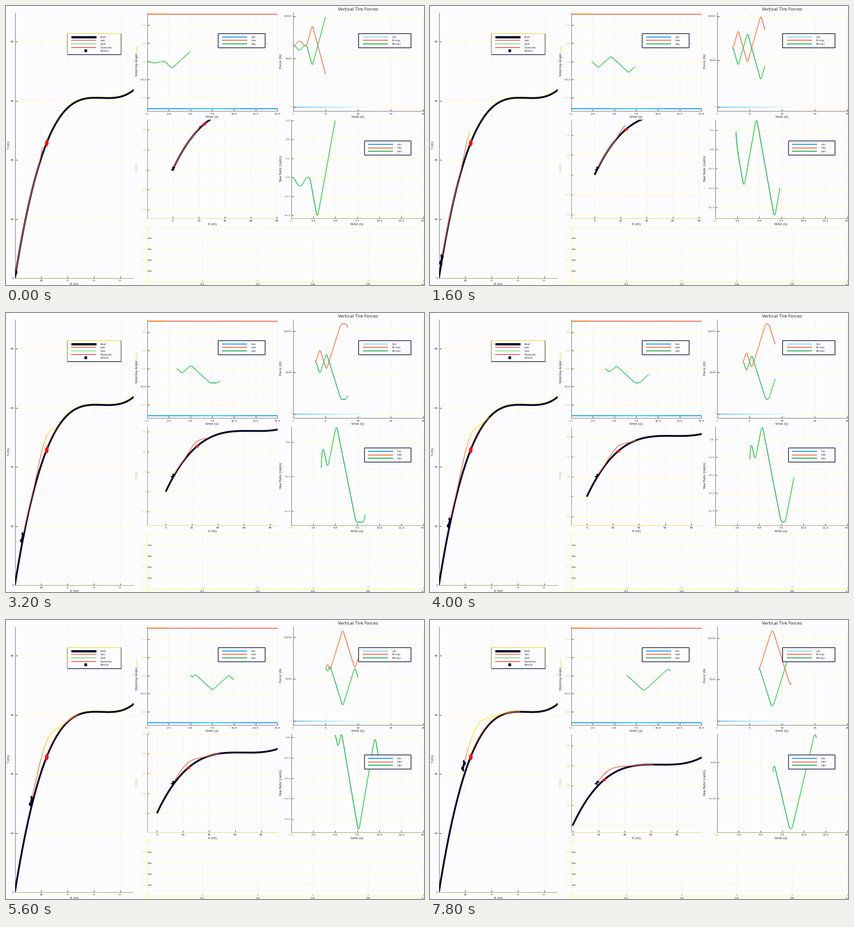
Animation of 917 by 611 pixels, one loop 8000 ms. Source, as a matplotlib script:

```python
import numpy as np
import matplotlib.pyplot as plt
from matplotlib.animation import FuncAnimation
from matplotlib.collections import LineCollection
from matplotlib.colors import to_rgb
from matplotlib.patches import Ellipse, Polygon, Rectangle

W, H, FRAMES = 917, 611, 40
PT = 0.72
NAVY, INK, DIM, YELLOW, PALE = "#04042c", "#26262e", "#8c8c50", "#f6f65a", "#ffffbe"
BLUE, CORAL, GREEN, RED = "#0a9af5", "#f4694a", "#22b056", "#f80f12"
CYAN, BACK, VGRID = "#5cccff", "#fcfcfe", "#f2f2de"

plt.rcParams["font.family"] = "DejaVu Sans"
fig = plt.figure(figsize=(W / 100, H / 100), dpi=100, facecolor=BACK)
ax = fig.add_axes([0, 0, 1, 1])
ax.set(xlim=(-0.5, W - 0.5), ylim=(H - 0.5, -0.5))  # pixel centres on integers
ax.axis("off")

BIG = (19, 13, 279, 595.5)
STEER = (309, 13, 595, 229)
FORCE = (629, 13, 916, 229)
LOCAL = (309, 248, 595, 464)
YAW = (625, 248, 915, 464)
LOW = (309, 483, 915, 603)
live = []


# ---- drawing helpers ----

def clip(art, box):
    if box:
        x0, y0, x1, y1 = box
        art.set_clip_path(Rectangle((x0, y0), x1 - x0, y1 - y0,
                                    transform=ax.transData))
    return art


def line(x, y, color, width=1.0, z=2, box=None):
    art, = ax.plot(x, y, color=color, lw=width * PT, zorder=z,
                   solid_capstyle="butt", solid_joinstyle="round")
    return clip(art, box)


def shaded(x, y, colors, width, z=4):
    p = np.c_[x, y]
    segs = np.stack([p[:-1], p[1:]], 1)
    return ax.add_collection(LineCollection(segs, colors=colors[:-1], zorder=z,
                                            linewidths=width * PT))


def gradient(stops, n):
    rgb = np.array([to_rgb(c) for c in stops])
    pos = np.linspace(0, 1, len(stops))
    return np.stack([np.interp(np.linspace(0, 1, n), pos, c) for c in rgb.T], 1)


def curve(x, y, falling, rising):
    # rising parts are drawn in a lighter tint
    up = np.gradient(y) < 0
    cols = np.where(up[:, None], to_rgb(rising), to_rgb(falling))
    live.append(shaded(x, y, cols, 1.9))


def text(x, y, s, size=6, color=INK, ha="center", va="center_baseline", rot=0):
    return ax.text(x, y, s, fontsize=size * PT, color=color, ha=ha,
                   va=va, rotation=rot, zorder=4)


def side(x, y, s, size=7, color=INK, va="center"):
    return text(x, y, s, size, color, va=va, rot=90)


def num(v, digits=1):
    return f"{v:.{digits}f}".replace("-", "−")


def xtick(x, box, label, color=INK, dy=6, tick=INK):
    return [line([x, x], [box[1], box[3]], VGRID, 1, 1),
            line([x, x], [box[3] - 4, box[3]], tick, 1, 3),
            text(x, box[3] + dy, label, 6, color)]


def ytick(y, box, label, color=INK, size=5, tick=INK):
    return [line([box[0], box[2]], [y, y], PALE, 1, 1),
            line([box[0], box[0] + size], [y, y], tick, 1, 3),
            text(box[0] - 2, y, label, 6, color, "right")]


def spines(box, left="#5a5a4c", bottom="#5a5a4c"):
    x0, y0, x1, y1 = box
    return [line([x0, x0], [y0, y1], left, 0.9, 3),
            line([x0, x1], [y1, y1], bottom, 0.9, 3)]


def legend(box, x, y, rows, edges=(NAVY,) * 4):
    x0, y0, x1, y1 = box
    ax.add_patch(Rectangle((x0, y0), x1 - x0, y1 - y0, fc=BACK, ec="none", zorder=6))
    corners = [(x0, y0), (x1, y0), (x1, y1), (x0, y1), (x0, y0)]
    for a, b, c in zip(corners, corners[1:], edges):
        line([a[0], b[0]], [a[1], b[1]], c, 1.4, 7)
    for k, (name, color, width) in enumerate(rows):
        yy = y + 7.7 * k
        if width:
            line([x, x + 55], [yy, yy], color, width, 7)
        else:
            ax.add_patch(Rectangle((x + 29, yy - 3), 6, 6, fc=color, ec="none", zorder=7))
        text(x + 64, yy, name, 5.3, INK, "left").set_zorder(7)


# ---- model ----

def softplus(v, scale=2):
    return scale * np.log1p(np.exp(v / scale))


def ramp(v, a, b):
    u = np.clip((v - a) / (b - a), 0, 1)
    return u * u * (3 - 2 * u)


def road(x):
    u = x - 66
    return 61 + 2.156e-4 * u ** 3 - 0.015 * u


def plan_path(i):
    # road plus a detour around the obstacle that widens as the car nears it
    x0 = softplus(5.5 + 0.574 * (i - 16))
    x = np.linspace(x0, 21 + softplus(1.25 * (i - 6.5)), 80)
    centre = np.interp(i, [32, 39], [23.3, 27])
    detour = (4.2 + 0.04 * i) * np.exp(-((x - centre) / (2.2 + 0.16 * i)) ** 2 / 2)
    drift = 1.5 * min(x0 / 3, 1) * np.exp(-(x - x0) / 6)
    return np.stack([x, road(x) + np.hypot(detour, drift)])


KEYS = [0, 4, 11, 16, 24, 32, 39]
LEFT_END = [5.2, 4.08, 5, 5.05, 5.45, 5.75, 6.4]
RIGHT_END = [6.5, 4.88, 8, 8.15, 7.6, 7.55, 8.55]
LAST_END = [8, 6.75, 10, 10, 9.3, 9.55, 11.2]
YAW_START = [0, 0.45, -0.18, -0.15, -0.075, 0.1, -0.065]
RATE, LOCK, DT, SPAN = 0.088, -0.16, 0.025, 5


def plan_steer(i):
    # the wheel turns at full rate, reversing at each switch time
    t0 = 1.32 + 0.131 * i if i else 0
    start = max(t0 + 0.05, 2.05)
    first = start + 0.85 * max(0, 1 - (i / 34) ** 1.5)
    switches = [start, first] + [max(first, np.interp(i, KEYS, row))
                                 for row in (LEFT_END, RIGHT_END, LAST_END)]
    pad = 5
    t = t0 + DT * np.arange(-pad, round(SPAN / DT) + pad + 1)
    v, out = 0, []
    for now in t:
        turns = sum(now >= s for s in switches)
        if turns:
            v = max(v + RATE * DT * (-1) ** turns, LOCK)
        out.append(v)
    n = 2 * pad + 1
    v = np.convolve(out, np.ones(n) / n, "valid")
    t = t[pad:-pad]
    wobble = np.where(t < 1.8, 0.016 * np.sin(np.pi * t / 1.8) ** 2, 0)
    return t, v - wobble


# ---- static parts ----

def to_big(x, y):
    return 19 + 2.89 * x, 595.5 - 6.47 * y


def draw_big_frame():
    for v in (20, 40, 60, 80):
        x, y = to_big(v, v)
        xtick(x, BIG, str(v), INK if v == 20 else DIM, 5)
        ytick(y, BIG, str(v))
    text(17, 595.5, "0", 6, INK, "right")
    spines(BIG, bottom="#8c8c3a")
    text(149, 607.5, "X (m)", 7)
    side(5, 304, "Y (m)")
    x = np.linspace(0, 92, 200)
    px, py = to_big(x, road(x))
    far = x > 24
    line(px[far] - 0.8, py[far] - 1.6, YELLOW, 2.5, 2, BIG)
    line(px, py, NAVY, 4, 3, BIG)
    ax.add_patch(Ellipse(to_big(24.2, 45.7), 7.8, 15, angle=8, fc=RED, ec="none", zorder=5))
    legend((133, 59, 251, 105), 142, 67,
           [("Road", NAVY, 5), ("mpc", CORAL, 1.8), ("Goal", "#58dc78", 1.5),
            ("Obstacles", "#fa4a40", 1.8), ("Vehicle", NAVY, 0)],
           ("#e2e23c", "#55552a", NAVY, DIM))


def draw_steer_frame():
    for k in range(7):
        xtick(309 + 47.6 * k, STEER, num(2.5 * k), INK if k else DIM)
    for k in range(-2, 3):
        ytick(121 - 39.6 * k, STEER, num(0.2 * k), INK if k == -1 else "#c8c864")
    spines(STEER)
    text(452, 241, "time (s)", 7.3)
    side(286.5, 154, "Steering Angle", 6.9, va="bottom")
    side(286.5, 102, "(rad)", 6.9, "#dcdc50", "bottom")
    line([309, 350], [15.8, 15.8], YELLOW, 1.2, 2)
    line([309, 595], [17, 17], CORAL, 1.9)
    shaded(np.linspace(309, 595, 60), np.full(60, 224.5),
           gradient([BLUE, BLUE, "#20c8f5", BLUE, BLUE], 60), 2, 2)
    legend((464, 59, 567, 90), 473.5, 67,
           [("min", BLUE, 2), ("max", CORAL, 2), ("mpc", GREEN, 2)])


def draw_force_frame():
    for k in range(5):
        xtick(629 + 71.4 * k, FORCE, str(5 * k), INK if k else DIM)
    ytick(220, FORCE, "0", "#c8c864")
    spines(FORCE)
    shaded(np.linspace(629, 800, 60), np.full(60, 220),
           gradient(["#1e90e8", CYAN, "#aaf0ff", BACK], 60), 1.4, 2)
    text(772, 6, "Vertical Tire Forces", 9.3)
    text(772, 241, "time (s)", 7.3)
    side(602.5, 121, "Force (N)")
    legend((772, 59, 887, 90), 782, 67,
           [("min", CYAN, 1.5), ("RL-mpc", CORAL, 2), ("RR-mpc", GREEN, 2)])


def draw_lower_frames():
    spines(LOCAL, "#77774a", "#d8d850")
    text(452, 476.5, "X (m)", 7)
    side(286.5, 356, "Y (m)", color="#b4b450")
    text(770, 476.5, "time (s)", 7.3)
    side(602.5, 356, "Yaw Rate (rad/s)", 7.1)
    legend((785, 294, 887, 325), 793.5, 302.3,
           [("min", BLUE, 2), ("max", CORAL, 2), ("mpc", GREEN, 2)])
    for k in range(6):
        ytick(603 - 24 * k, LOW, num(0.2 * k), "#f0f078", 9, INK if 0 < k < 5 else YELLOW)
        xtick(309 + 121.2 * k, LOW, num(0.2 * k), INK if k else YELLOW, 5.5, DIM)
    spines(LOW, YELLOW, YELLOW)


# ---- moving parts ----

def vehicle(pos, heading, project, box):
    c, s = np.cos(heading), np.sin(heading)
    parts = [(0, 0, 3.5, 1.2)]
    parts += [(a, b, 0.9, 0.5) for a in (-1.3, 1.3) for b in (-0.8, 0.8)]
    for u, v, length, width in parts:
        lx = u + length / 2 * np.array([-1, 1, 1, -1])
        ly = v + width / 2 * np.array([-1, -1, 1, 1])
        px, py = project(pos[0] + lx * c - ly * s, pos[1] + lx * s + ly * c)
        shape = Polygon(np.c_[px, py], fc=NAVY, ec=NAVY, lw=0.4, zorder=6)
        live.append(clip(ax.add_patch(shape), box))


def draw_big(x, y, heading):
    warm = ramp(y, 40, 55)
    if x[-1] > 38:
        warm = warm * (1 - ramp(np.linspace(0, 1, len(x)), 0.74, 0.92))
    coral, gold = np.array(to_rgb("#f26b40")), np.array(to_rgb("#ffed33"))
    live.append(shaded(*to_big(x, y), coral + warm[:, None] * (gold - coral), 1.6))
    if x[-1] > 26:
        rx = np.linspace(25, x[-1], 60)
        qx, qy = to_big(rx, road(rx))
        live.append(line(qx - 1.2, qy - 1, "#d8282c", 0.9, 4))
    vehicle((x[0], y[0]), heading, to_big, BIG)


def draw_local(x, y, heading):
    def project(a, b):
        return 366 + 2.86 * (a - x[0]), 356 - 2.18 * (b - y[0])

    for v in range(-60, 121, 20):
        px, py = project(v, v)
        if LOCAL[0] - 0.5 <= px <= LOCAL[2]:
            live.extend(xtick(px, LOCAL, num(v, 0), INK if v >= 0 else DIM))
        if LOCAL[1] <= py <= LOCAL[3]:
            live.extend(ytick(py, LOCAL, num(v, 0), "#d2d264", 4, "#5a5a44"))
    rx = np.linspace(0, 105, 200)
    live.append(line(*project(rx, road(rx)), NAVY, 4, 3, LOCAL))
    live.append(line(*project(x, y), CORAL, 1.6, 4, LOCAL))
    spot = Ellipse(project(24.2, 45.7), 8, 6, angle=-20, fc=RED, ec="none", zorder=5)
    live.append(clip(ax.add_patch(spot), LOCAL))
    vehicle((x[0], y[0]), heading, project, LOCAL)


def draw_force(t, lagged):
    rl, rr = 6.32 - 28.5 * lagged, 6.33 + 28.5 * lagged
    unit = 196.5 / max(rl.max(), rr.max())
    for v in (5, 10):
        live.extend(ytick(max(220 - unit * v, 22), FORCE, str(v * 1000), "#55554c"))
    x = 629 + 14.28 * t
    curve(x, 220 - unit * rl, CORAL, "#f87c3c")
    curve(x, 220 - unit * rr, GREEN, "#36cc4c")


def draw_yaw(t, lagged, start):
    settle = (start - 2.9 * lagged[0]) * np.exp(-(t - t[0]) / 0.1)
    v = 2.9 * lagged + settle
    lo, span = v.min(), np.ptp(v)
    step = 0.1 if span < 0.53 else 0.2 if span < 0.64 else 0.25
    digits = 2 if step == 0.25 else 1
    wide = digits == 2 and lo < -step
    box = (YAW[0] + 4 * wide,) + YAW[1:]

    def py(val):
        return 457.5 - 207 / span * (val - lo)

    for k in range(-6, 7):
        y = py(k * step)
        if box[1] + 2 < y < box[3] + 1:
            live.extend(ytick(y, box, num(k * step, digits), "#55554c", 4))
    sx = (box[2] - box[0]) / 15
    for k in range(7):
        live.extend(xtick(box[0] + 2.5 * k * sx, box, num(2.5 * k), INK if k else "#b4b450"))
    live.extend(spines(box, bottom="#8c8c40"))
    curve(box[0] + sx * t, py(v), GREEN, "#36cc4c")


def reset():
    while live:
        live.pop().remove()
    return []


def update(i):
    reset()
    x, y = plan_path(i)
    heading = np.arctan2(y[1] - y[0], x[1] - x[0])
    draw_big(x, y, heading)
    draw_local(x, y, heading)
    t, steer = plan_steer(i)
    curve(309 + 19.03 * t, 121 - 198 * steer, GREEN, "#36cc4c")
    lagged = np.interp(t - 0.1, t, steer)
    draw_force(t, lagged)
    draw_yaw(t, lagged, np.interp(i, KEYS, YAW_START))
    return live


draw_big_frame()
draw_steer_frame()
draw_force_frame()
draw_lower_frames()
anim = FuncAnimation(fig, update, frames=FRAMES, init_func=reset, interval=200,
                     repeat=True, repeat_delay=0, blit=False)
plt.show()
```
